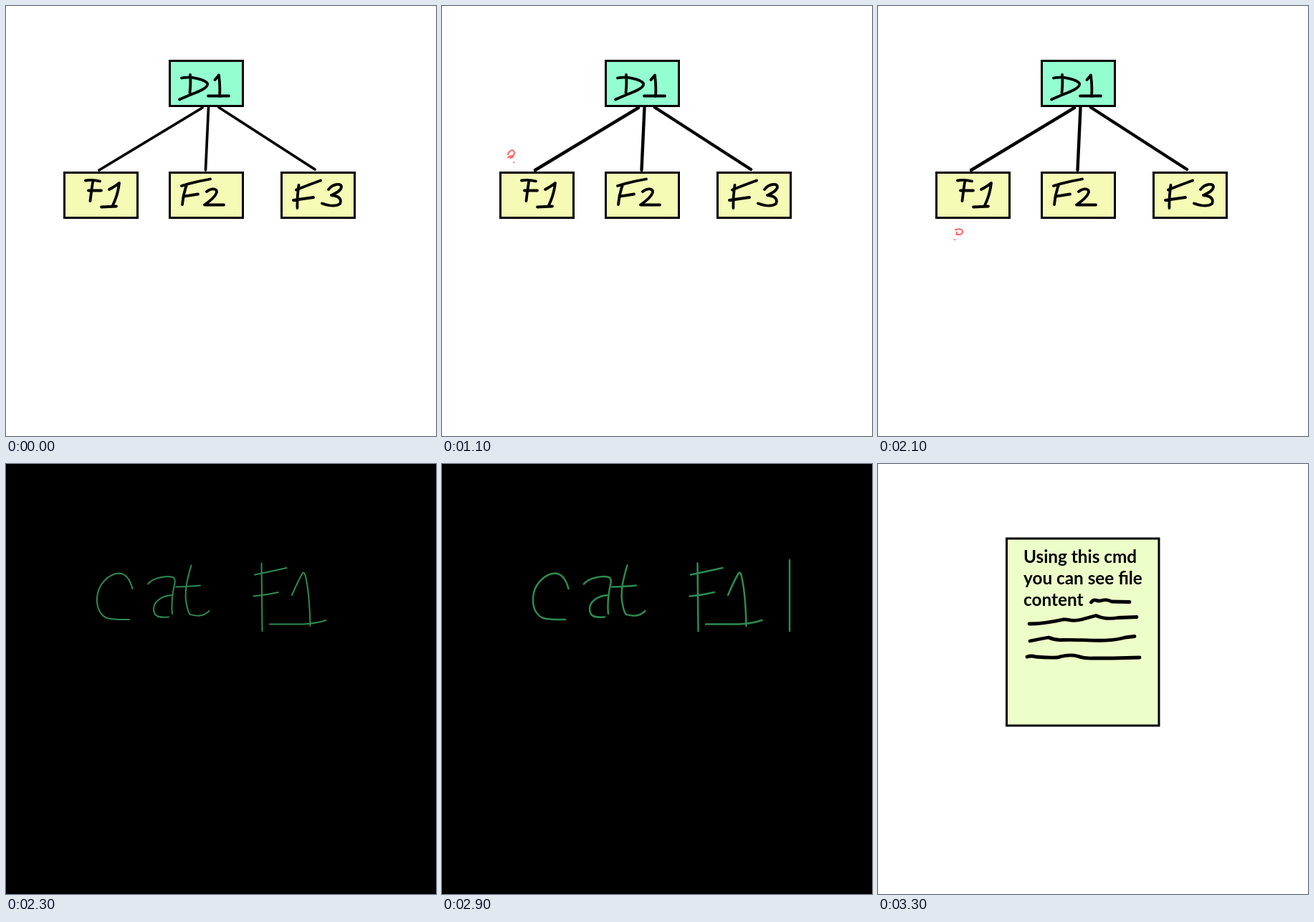
An HTML page for the animation above (4.3 s loop, 600 by 600 pixels).

```html
<!DOCTYPE html>
<html lang="en">
<head>
<meta charset="utf-8">
<style>
  html, body { margin: 0; width: 100%; height: 100%; overflow: hidden; background: #fff; }
  svg { display: block; width: 100vw; height: 100vh; }
  path { fill: none; stroke-linecap: round; stroke-linejoin: round; }
  rect { stroke: #000; stroke-width: 3; }
  .ink { stroke: #000; stroke-width: 3.8; }
  .ask { stroke: #ff6262; stroke-width: 2; }
  .shell { stroke: #2e8b50; }
  text { font: bold 24.3px Lato, "Open Sans", sans-serif; }
</style>
</head>
<body>
<svg viewBox="0 0 600 600">
  <g id="tree">
    <path id="links" stroke="#000" d="M274 142L130 229M282.5 142L278.5 229M297 141.5L431 228"/>
    <rect x="228.5" y="76.5" width="102" height="63" fill="#93ffd0"/>
    <g fill="#f5fab4">
      <rect x="81.5" y="232.5" width="102" height="63"/>
      <rect x="228.5" y="232.5" width="102" height="63"/>
      <rect x="384.5" y="232.5" width="102" height="63"/>
    </g>
    <path class="ink" d="M257 96Q258 108 256.5 121M245 100.5C258 98 277 102 281 108C283 116 262 121 242 130.5M291.5 103L297 96.5Q299 112 298 126M282 125.5L311 125.5"/>
    <path class="ink" d="M111 243.5Q121 242 131 244.5M121 246Q119 259 117.5 272M115 257.5L133 257.5M144 256Q152 252 158 247Q156 264 149 278M133 280.5L154 279.5"/>
    <path class="ink" d="M245 251Q264 245 285 241.5M252 250Q247 263 246 277M249 265.5L268 262.5M280 259C287 253 295 255 294 260C292 267 282 274 277 277.5L304 277.5"/>
    <path class="ink" d="M405 256.5Q421 250 439 243.5M408.5 250Q406 266 406.5 282M401 271L429 267M450 256C455 249 467 246 468 252C468 258 460 261 454 264C464 265 469 269 466 276C459 281 448 278 441 275.5"/>
    <path class="ask" d="M92 207Q95 200.5 99 201.5Q103 205 99 209Q94 209 92 211.5M95 212L99 210.5M100.5 218V218.2"/>
    <path class="ask" d="M149 204Q154 200 158 203Q160 209 153 211L152 213M151 218V218.2"/>
    <path class="ask" d="M108 312.5Q113 310 117.5 313Q119 318 114 319L109.5 319L110 315.5M107 326V326.2"/>
  </g>
  <g id="term">
    <rect width="600" height="600" stroke="none" style="stroke:none"/>
    <g id="cmd">
      <path class="shell" d="M176.500 174C173 161 167 153 158 152.500C143 153 128 168 127 187C126 202 133 212 141 215Q150 217.500 172 217"/>
      <path class="shell" d="M198 167.500C204 159 224 155 233 158Q236.500 160 235.500 166Q230 190 232 209M231 183C216 184 206 193 206 202C206 213 213 214.500 227 213.500M258.500 141.500C253 159 248 180 252 196Q254 207 257 210C266 212 274 214 283.500 205M237 171.500Q254 171 271 169.500"/>
      <path class="shell" d="M356.500 138.500Q357 185 357.500 233M347 154.500Q369 150 391.500 145M345.500 184.500Q363 183 380 179M399 183Q407 164 414 152Q416 150.500 417.500 155C423 176 424 203 424.500 226M368 223.500C393 223 425 226 446.500 218"/>
    </g>
    <path id="caret" class="shell" stroke-width="2.4" d="M485 134V233"/>
  </g>
  <g id="note">
    <rect x="179.500" y="104" width="212.500" height="261" fill="#edffc8"/>
    <text x="203" y="138">Using this cmd</text>
    <text x="203" y="168">you can see file</text>
    <text x="203" y="198">content</text>
    <path class="ink" style="stroke-width:4.8" d="M297.500 193Q300 189 304 190Q308 192 314 190Q320 188.500 326 192L351 192.500M211 223C230 223 245 220 258 217C268 216 268 221 284 217Q295 214 304 211.500C312 215 320 217 335 214.500L361 213.500M212 247Q226 244 238 242Q247 246 257 245.500C280 244 320 250 345 242L358 240.500M208 269Q214 267 220 269Q235 270.500 250 270C260 267 270 266 278 268Q288 271.500 300 271H328L365 270"/>
  </g>
</svg>
<script>
  const LOOP = 4300, STEP = 200, ASK = 500, TERM = 2300, NOTE = 3300;
  const el = id => document.getElementById(id);
  const show = (node, on) => node.setAttribute("visibility", on ? "visible" : "hidden");
  const asks = [...document.querySelectorAll(".ask")];

  function draw(t) {
    const tree = t < TERM, term = !tree && t < NOTE;
    show(el("tree"), tree);
    show(el("term"), term);
    show(el("note"), t >= NOTE);

    // the question mark circles the first box
    const spot = Math.floor((t - ASK) / STEP) % 3;
    asks.forEach((a, i) => show(a, tree && t >= ASK && i === spot));
    el("links").setAttribute("stroke-width", t < ASK ? 3.7 : 4.4);

    const blink = term && Math.floor((t - TERM) / STEP) % 2 === 1;
    show(el("caret"), blink);
    el("cmd").setAttribute("stroke-width", blink ? 2.5 : 2);
  }

  const start = performance.now();
  function tick() {
    draw((performance.now() - start) % LOOP);
    requestAnimationFrame(tick);
  }
  draw(0);
  requestAnimationFrame(tick);
</script>
</body>
</html>
```
